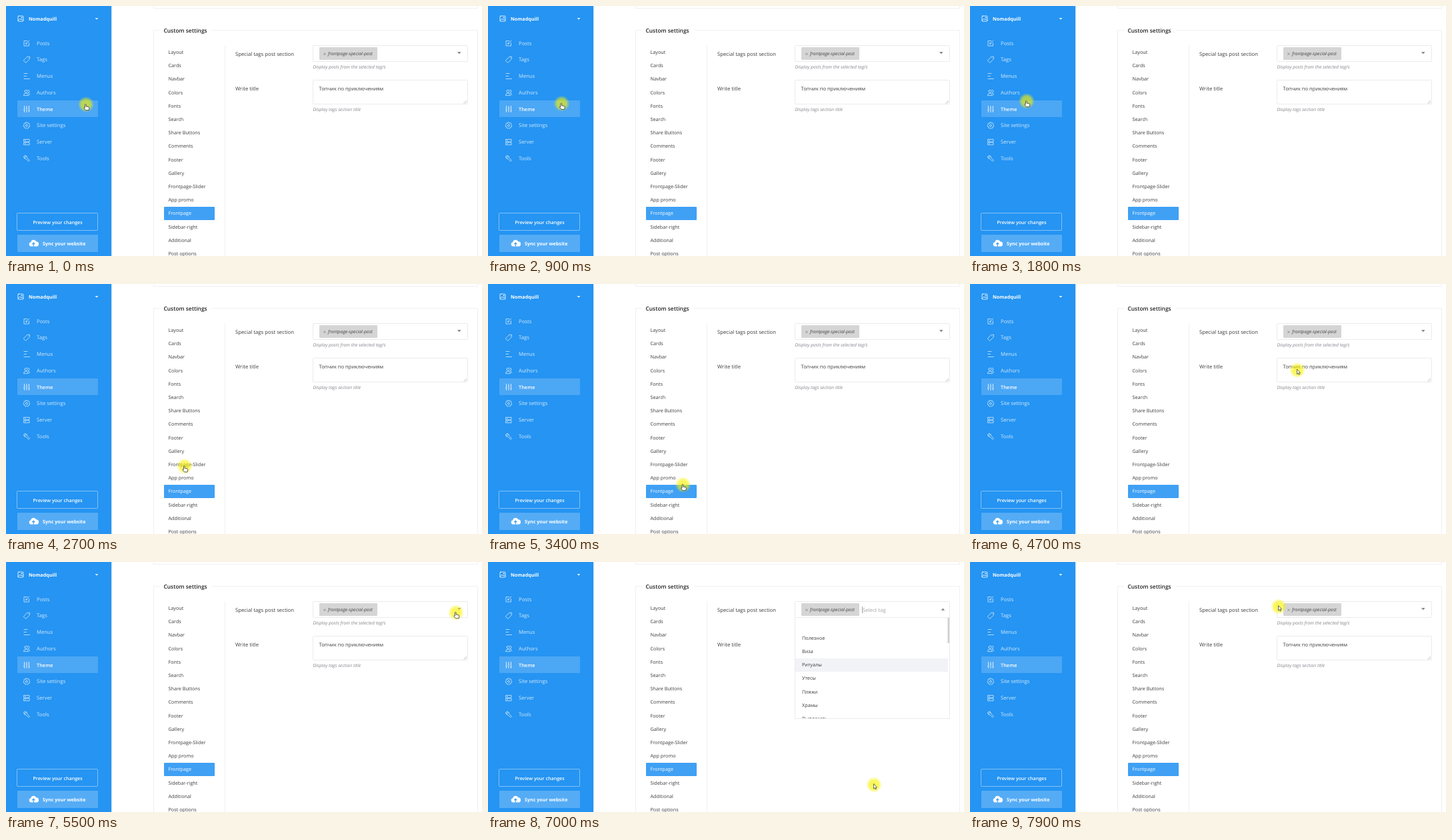
An HTML page that plays this animation: 714 by 376 pixels, repeating every 8000 ms.

```html
<!DOCTYPE html>
<html lang="en">
<head>
<meta charset="utf-8">
<title>Theme settings</title>
<style>
html, body { margin: 0; width: 100%; height: 100%; overflow: hidden; background: #fff; }
svg { display: block; width: 714px; height: 376px; }
text { font-family: "Open Sans", "Noto Sans", sans-serif; font-size: 7.75px; fill: #3c3c3c; text-rendering: geometricPrecision; }
.side text { fill: #fff; }
.bold { font-weight: 700; }
.semi { font-weight: 600; }
.help { font-style: italic; font-size: 6.8px; fill: #85858d; }
.small { font-size: 7.25px; }
.line { fill: none; stroke: #f0f0f0; }
.box { fill: #fff; stroke: #ebebeb; }
.icon { fill: none; stroke: #fff; stroke-width: .8; stroke-linecap: round; stroke-linejoin: round; }
</style>
</head>
<body>
<svg viewBox="0 0 714 376">
  <defs>
    <radialGradient id="glow">
      <stop stop-color="#f6f000" stop-opacity=".7"/>
      <stop offset=".6" stop-color="#f8f200" stop-opacity=".6"/>
      <stop offset="1" stop-color="#faf400" stop-opacity="0"/>
    </radialGradient>
    <clipPath id="listClip"><path d="M461 84H692V235H461z"/></clipPath>
  </defs>
  <rect width="714" height="376" fill="#fff"/>

  <g class="side">
    <rect width="158" height="376" fill="#2594f2"/>
    <rect x="158" width="1" height="376" fill="#d5e5f4"/>
    <g class="icon" transform="translate(22 19)">
      <rect x="-4" y="-4" width="8" height="8" rx="1"/>
      <path d="M-4 3L-1 0 1 2 2.3 .8 4 2.5"/><circle cx="1.5" cy="-1.5" r=".6"/>
    </g>
    <text class="bold" x="34" y="21.8" style="font-size:7.2px">Nomadquill</text>
    <path d="M133.6 18H138.4L136 20.6z" fill="#fff"/>
    <rect x="17" y="142" width="121" height="25" rx="1" fill="#fff" opacity=".18"/>
    <g id="nav"></g>
    <rect x="16.5" y="311.5" width="121" height="26" rx="1" fill="none" stroke="#fff" stroke-opacity=".42"/>
    <text class="semi" x="77.5" y="328" text-anchor="middle" style="font-size:7.1px">Preview your changes</text>
    <rect x="17" y="344" width="121" height="26" rx="1" fill="#fff" opacity=".22"/>
    <path d="M37.5 361.5a3.2 3.2 0 0 1-.3-6.3 4.4 4.4 0 0 1 8.3-.9 3.6 3.6 0 0 1 0 7.2z" fill="#fff"/>
    <path d="M41.3 361.5V356.5M39.2 358.3L41.3 356.2 43.4 358.3" fill="none" stroke="#379df2" stroke-width="1.2"/>
    <text class="bold" x="55" y="360" style="font-size:7.15px">Sync your website</text>
  </g>

  <path class="line" d="M221.5 0V3.5H707.5V0M231 36.5H221.5V376M309 36.5H707.5V376M328.5 59V376"/>
  <text class="semi" x="236.5" y="40" style="font-size:8.4px;fill:#222">Custom settings</text>
  <rect x="237" y="302" width="76" height="20" rx="1" fill="#3fa0f4"/>
  <g id="menu"></g>

  <text x="344" y="75">Special tags post section</text>
  <text x="344" y="127.3">Write title</text>
  <rect class="box" x="460.5" y="59.5" width="232" height="24" rx="1"/>
  <rect x="470" y="62" width="87" height="19" rx="1" fill="#d5d5d5"/>
  <path d="M476.3 70.6l3.2 3.2m0-3.2l-3.2 3.2" stroke="#777" stroke-width=".7"/>
  <text class="help" x="483" y="74.4" style="fill:#444">frontpage-special-post</text>
  <text class="help" x="460.5" y="93.8">Display posts from the selected tag/s</text>
  <rect class="box" x="460.5" y="111.5" width="232" height="36" rx="1"/>
  <path d="M686.5 146.5l4.5-4.5m-2 4.5l2-2" stroke="#999" stroke-width=".6"/>
  <text x="469.5" y="126.6" style="font-size:7.6px">Топчик по приключениям</text>
  <text class="help" x="460.5" y="157.8">Display tags section title</text>
  <path id="arrow" fill="#858585"/>

  <g id="drop">
    <path d="M561.5 67V77" stroke="#777" stroke-width=".7"/>
    <text x="562" y="74.8" style="fill:#a5a5a5">Select tag</text>
    <rect class="box" x="460.5" y="83.5" width="232" height="152"/>
    <rect id="hover" x="461" width="229" height="20" fill="#f2f3f6"/>
    <g id="options" clip-path="url(#listClip)"></g>
    <rect x="689.5" y="84" width="2.5" height="38" fill="#d0d0d0"/>
  </g>

  <g id="cursor">
    <circle r="12" fill="url(#glow)"/>
    <path id="hand" d="M-1.6 0Q-.7-1.3.2 0V3.1L3.3 3.6Q4.9 4 4.8 5.3L4.2 8.8H-.3L-3.3 5.3Q-3 4.2-1.6 5.1z" fill="#fff" stroke="#333" stroke-width=".8" stroke-linejoin="round"/>
    <path id="point" d="M-.5-1.5V6L1.2 4.5 2.3 7 3.4 6.5 2.4 4.1H4.5z" fill="#fff" stroke="#333" stroke-width=".7" stroke-linejoin="round"/>
  </g>
</svg>
<script>
const $ = id => document.getElementById(id);
const LOOP = 8000, STEP = 100, ROW = 20.2, OPEN = 5700, CLOSE = 7400;

// label and icon outline, centred on its own origin
const nav = [
  ["Posts", "M1-3.5H-4V4H3.5V-.5M-1 1L4-4M-1 1V-.8M-1 1H.8"],
  ["Tags", "M-4.5 1L1-4.5H4.5V-1L-1 4.5zM2.4-2.4h.1"],
  ["Menus", "M-4-4H1M-4 0H-.5M-4 4H4.5"],
  ["Authors", "M-4.5 4Q-4.5 .8-1 .8T2.5 4zM-3-2a2 2 0 1 0 4 0a2 2 0 1 0-4 0M2-4a2 2 0 0 1 0 4Q4.5 .8 4.5 3.5"],
  ["Theme", "M-3.5-4.5V0M-3.5 2.5V4.5M0-4.5V-2.5M0 0V4.5M3.5-4.5V1M3.5 3.5V4.5M-4.5 1.2h2M-1-1.2h2M2.5 2.2h2"],
  ["Site settings", "M-1-4.7H1L1.5-3.4 3.2-3.8 4.3-2.2 3.5-1 4.8 0 4.3 2 2.9 2.2 2.7 3.8 1 4.7 0 3.6-1 4.7-2.7 3.8-2.9 2.2-4.3 2-4.8 0-3.5-1-4.3-2.2-3.2-3.8-1.5-3.4zM-1.5 0a1.5 1.5 0 1 0 3 0a1.5 1.5 0 1 0-3 0"],
  ["Server", "M-4-4H4V-.5H-4zM-4 .8H4V4.3H-4zM-2.5-2.2h1M-2.5 2.5h1"],
  ["Tools", "M-4.3-2.5L-2.5-4.3Q1-4 .7-1L4.5 3 3 4.5-1 .7Q-4 1-4.3-2.5L-2.5-1-1-2.5-2.5-4.3"]
];
const menu = ["Layout", "Cards", "Navbar", "Colors", "Fonts", "Search", "Share Buttons", "Comments",
  "Footer", "Gallery", "Frontpage-Slider", "App promo", "Frontpage", "Sidebar-right", "Additional", "Post options"];
const options = ["Полезное", "Виза", "Ритуалы", "Утесы", "Пляжи", "Храмы", "Выплакать"];

$("nav").innerHTML = nav.map(([label, d], i) => {
  const y = 56 + i * 24.75, active = label === "Theme";
  return `<g opacity="${active ? 1 : .8}"><path class="icon" transform="translate(31 ${y})" d="${d}"/>
    <text x="46" y="${y + 2.7}" ${active ? 'class="semi" style="font-size:7.4px"' : ""}>${label}</text></g>`;
}).join("");

const column = (items, x, y) => items.map((label, i) =>
  `<text class="small" x="${x}" y="${y + i * ROW}" ${label === "Frontpage" ? 'style="fill:#fff"' : ""}>${label}</text>`).join("");
$("menu").innerHTML = column(menu, 243.5, 72);
$("options").innerHTML = column(options, 471, 116.8);

// time, x, y
const path = [
  [0, 120, 148], [600, 119, 148], [1800, 85, 143], [2000, 90, 147], [2400, 200, 235], [2700, 268, 274],
  [3300, 290, 300], [4000, 308, 313], [4200, 340, 290], [4300, 375, 262], [4400, 403, 198],
  [4500, 445, 146], [5000, 560, 105], [5400, 626, 84], [5500, 675, 76], [5900, 677, 78],
  [6300, 694, 155], [6600, 640, 270], [6900, 579, 335], [7050, 579, 335], [7200, 568, 318],
  [7800, 468, 80], [7900, 463, 67], [8000, 463, 67]
];

function place(t) {
  const i = path.findIndex(p => p[0] > t);
  const [t0, x0, y0] = path[i - 1], [t1, x1, y1] = path[i];
  const k = (t - t0) / (t1 - t0);
  return [x0 + (x1 - x0) * k, y0 + (y1 - y0) * k];
}

function draw(now) {
  const t = Math.floor(now % LOOP / STEP) * STEP;
  const [x, y] = place(t);
  const open = t >= OPEN && t < CLOSE;
  const within = (l, top, r, b) => x > l && x < r && y > top && y < b;
  const hand = within(17, 42, 138, 242) || within(237, 59, 313, 376) ||
    within(465, 59, 692, 84) || open && within(461, 84, 690, 235);

  $("cursor").setAttribute("transform", `translate(${x} ${y})`);
  $("hand").style.display = hand ? "" : "none";
  $("point").style.display = hand ? "none" : "";
  $("drop").style.display = open ? "" : "none";
  $("arrow").setAttribute("d", open ? "M679.6 72.7H685.2L682.4 69.6z" : "M677 69H682.6L679.8 72.2z");

  // the pointer leaves the list sideways, so the third tag stays lit
  const row = t > 6300 ? 3 : Math.max(0, Math.min(3, Math.round((y - 94) / ROW)));
  $("hover").setAttribute("y", 84.4 + row * ROW);
}

const start = performance.now();
function tick() {
  draw(performance.now() - start);
  requestAnimationFrame(tick);
}
tick();
</script>
</body>
</html>
```
